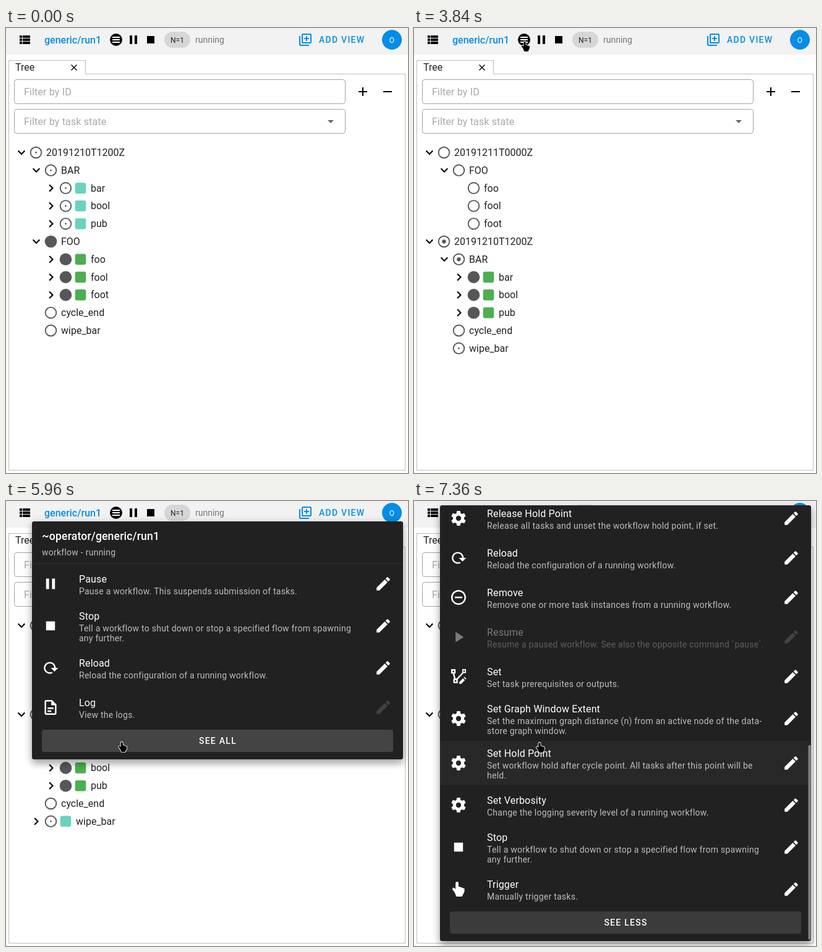
An HTML page with a canvas that plays this animation: 650x720 px, repeating every 8000 ms.

```html
<!DOCTYPE html>
<html lang="en">
<head>
<meta charset="utf-8">
<title>Workflow tree and command menu</title>
<style>
  html, body { margin: 0; width: 650px; height: 720px; overflow: hidden; background: #fff; }
  canvas { display: block; }
</style>
</head>
<body>
<canvas id="stage" width="650" height="720"></canvas>
<script>
const ctx = document.getElementById('stage').getContext('2d');
const LOOP = 8000;
const BLUE = '#058de7', INK = '#212121', GREY = '#575757';
const JOB = { submitted: '#6ad2bf', running: '#66a0ee', succeeded: '#4caf50' };

// Icons on a 24 unit grid
const DISC = 'M12,2A10,10 0 0,1 12,22A10,10 0 0,1 12,2';
const RING = DISC + 'M12,4A8,8 0 0,1 12,20A8,8 0 0,1 12,4';

function cogPath() {
  const points = [];
  for (let k = 0; k < 6; k++) {
    for (const [r, offset] of [[7.5, -22], [10.2, -12], [10.2, 12], [7.5, 22]]) {
      const a = (k * 60 + 30 + offset) * Math.PI / 180;
      points.push((12 + r * Math.cos(a)).toFixed(2) + ',' + (12 + r * Math.sin(a)).toFixed(2));
    }
  }
  return 'M' + points.join('L') + 'ZM12,8.5A3.5,3.5 0 0,1 12,15.5A3.5,3.5 0 0,1 12,8.5Z';
}

const icons = {
  list: 'M9,5V9H21V5M9,19H21V15H9M9,14H21V10H9M4,9H8V5H4M4,19H8V15H4M4,14H8V10H4V14Z',
  pause: 'M14,19H18V5H14M6,19H10V5H6V19Z',
  stop: 'M18,18H6V6H18V18Z',
  add: 'M4,6H2V20A2,2 0 0,0 4,22H18V20H4V6M20,2H8A2,2 0 0,0 6,4V16A2,2 0 0,0 8,18H20A2,2 0 0,0 22,16V4A2,2 0 0,0 20,2M20,16H8V4H20V16M13,14H15V11H18V9H15V6H13V9H10V11H13V14',
  plus: 'M19,13H13V19H11V13H5V11H11V5H13V11H19V13Z',
  minus: 'M19,13H5V11H19V13Z',
  caret: 'M7,10L12,15L17,10H7Z',
  down: 'M7.41,8.3L12,12.9L16.59,8.3L18.1,9.8L12,15.9L5.9,9.8Z',
  right: 'M8.4,16.58L12.98,12L8.4,7.41L9.9,5.9L16,12L9.9,18.1Z',
  pencil: 'M20.71,7.04C21.1,6.65 21.1,6 20.71,5.63L18.37,3.29C18,2.9 17.35,2.9 16.96,3.29L15.12,5.12L18.87,8.87M3,17.25V21H6.75L17.81,9.93L14.06,6.18L3,17.25Z',
  reload: 'M19,12H22.32L17.37,16.95L12.42,12H16.97C17,10.46 16.42,8.93 15.24,7.75C12.9,5.41 9.1,5.41 6.76,7.75C4.42,10.09 4.42,13.9 6.76,16.24C8.6,18.08 11.36,18.47 13.58,17.41L15.05,18.88C12,20.69 8,20.29 5.34,17.65C2.22,14.53 2.23,9.47 5.35,6.35C8.5,3.22 13.53,3.21 16.66,6.34C18.22,7.9 19,9.95 19,12Z',
  file: 'M6,2A2,2 0 0,0 4,4V20A2,2 0 0,0 6,22H18A2,2 0 0,0 20,20V8L14,2H6M6,4H13V9H18V20H6V4M8,12V14H16V12H8M8,16V18H13V16H8Z',
  horn: 'M12,8H4A2,2 0 0,0 2,10V14A2,2 0 0,0 4,16H5V20A1,1 0 0,0 6,21H8A1,1 0 0,0 9,20V16H12L17,20V4L12,8M21.5,12C21.5,13.71 20.54,15.26 19,16V8C20.53,8.75 21.5,10.3 21.5,12Z',
  bin: 'M19,4H15.5L14.5,3H9.5L8.5,4H5V6H19M6,19A2,2 0 0,0 8,21H16A2,2 0 0,0 18,19V7H6V19Z',
  cog: cogPath(),
  hold: RING + 'M13,16V8H15V16H13M9,16V8H11V16H9',
  kill: DISC + 'M15.59,7L12,10.59L8.41,7L7,8.41L10.59,12L7,15.59L8.41,17L12,13.41L15.59,17L17,15.59L13.41,12L17,8.41Z',
  mail: 'M20,8L12,13L4,8V6L12,11L20,6M20,4H4C2.89,4 2,4.89 2,6V18A2,2 0 0,0 4,20H20A2,2 0 0,0 22,18V6C22,4.89 21.1,4 20,4Z',
  play: 'M8,5.14V19.14L19,12.14L8,5.14Z',
  poll: DISC + 'M18,11H13L14.81,9.19A3.94,3.94 0 0,0 12,8A4,4 0 1,0 15.86,13H17.91A6,6 0 1,1 12,6A5.91,5.91 0 0,1 16.22,7.78L18,6Z',
  release: RING + 'M10,16.5L16,12L10,7.5Z',
  remove: RING + 'M7,13H17V11H7Z',
  nodes: 'M2,2H8V8H6.3L8,14.5H9.5L17,6.5V2H22V7.5H18.7L11,16V21H5V15H6L4.3,8H2ZM4,4V6H6V4ZM7,17V19H9V17ZM18.5,3.7V5.7H20.5V3.7ZM13,19.5V22H15.5L20.5,17L18,14.5ZM19,13.5L20,12.5L22.5,15L21.5,16Z',
  hand: 'M10,2A2,2 0 0,1 12,4V8.5C12,8.5 14,8.25 14,9.25C14,9.25 16,9 16,10C16,10 18,9.75 18,10.75C18,10.75 20,10.5 20,11.5V15C20,16 17,21 17,22H9C9,22 7,15 4,13C4,13 3,7 8,12V4A2,2 0 0,1 10,2Z'
};
for (const name in icons) icons[name] = new Path2D(icons[name]);
const arrow = new Path2D('M0,0V16L3.7,12.6L6.3,18.2L9,17L6.5,11.6H11.5Z');

// Commands: icon, title, text lines, flags (d = disabled, r = read only)
const commands = [
  ['horn', 'Broadcast', 'Override `[runtime]` configurations in a running workflow.'],
  ['bin', 'Clean', 'Clean a workflow from the run directory.', 'd'],
  ['cog', 'Ext Trigger', 'Report an external event message to a scheduler.'],
  ['hold', 'Hold', 'Hold tasks within a workflow.'],
  ['kill', 'Kill', 'Kill running or submitted jobs.'],
  ['file', 'Log', 'View the logs.', 'r'],
  ['mail', 'Message', 'Record task messages.'],
  ['pause', 'Pause', 'Pause a workflow. This suspends submission of tasks.'],
  ['play', 'Play', 'Start, resume or restart a workflow run.', 'd'],
  ['poll', 'Poll', 'Poll (query) jobs to verify and update their statuses.'],
  ['release', 'Release', 'Release held tasks within a workflow.'],
  ['cog', 'Release Hold Point', 'Release all tasks and unset the workflow hold point, if set.'],
  ['reload', 'Reload', 'Reload the configuration of a running workflow.'],
  ['remove', 'Remove', 'Remove one or more task instances from a running workflow.'],
  ['play', 'Resume', 'Resume a paused workflow. See also the opposite command `pause`.', 'd'],
  ['nodes', 'Set', 'Set task prerequisites or outputs.'],
  ['cog', 'Set Graph Window Extent', 'Set the maximum graph distance (n) from an active node of the data-\nstore graph window.'],
  ['cog', 'Set Hold Point', 'Set workflow hold after cycle point. All tasks after this point will be\nheld.'],
  ['cog', 'Set Verbosity', 'Change the logging severity level of a running workflow.'],
  ['stop', 'Stop', 'Tell a workflow to shut down or stop a specified flow from spawning\nany further.'],
  ['hand', 'Trigger', 'Manually trigger tasks.']
];
const shortList = ['Pause', 'Stop', 'Reload', 'Log'].map(n => commands.find(c => c[1] === n));

const clamp = v => Math.min(1, Math.max(0, v));
const smooth = v => (v = clamp(v), v * v * (3 - 2 * v));

function text(str, x, y, size, color, weight = 400, spacing = 0, align = 'left') {
  ctx.font = `${weight} ${size}px Roboto, sans-serif`;
  ctx.letterSpacing = spacing + 'px';
  ctx.textAlign = align;
  ctx.fillStyle = color;
  ctx.fillText(str, x, y);
}

function icon(name, x, y, color, scale = 1) {
  ctx.save();
  ctx.translate(x - 12 * scale, y - 12 * scale);
  ctx.scale(scale, scale);
  ctx.fillStyle = color;
  ctx.fill(icons[name], 'evenodd');
  ctx.restore();
}

function box(x, y, w, h, color) {
  ctx.fillStyle = color;
  ctx.fillRect(x, y, w, h);
}

function roundBox(x, y, w, h, r) {
  ctx.beginPath();
  ctx.roundRect(x, y, w, h, r);
}

function disc(x, y, r, color) {
  ctx.beginPath();
  ctx.arc(x, y, r, 0, 7);
  ctx.fillStyle = color;
  ctx.fill();
}

// Pointer moves: start, end, from x, y, to x, y
const moves = [
  [1880, 3400, 60, 612, 179, 22],
  [5080, 5880, 179, 22, 187, 388],
  [5920, 6040, 187, 388, 188, 395],
  [6640, 7240, 188, 395, 203, 391]
];

function pointer(t) {
  const move = moves.findLast(m => t >= m[0]);
  if (!move) return null;
  const [start, end, x0, y0, x1, y1] = move;
  const u = clamp((t - start) / (end - start));
  const first = move === moves[0];
  const p = smooth(first ? 1 - (1 - u) ** 2 : u);
  const px = first ? 1 - (1 - p) ** 2 : p;
  return { x: x0 + (x1 - x0) * px, y: y0 + (y1 - y0) * p };
}

function drawPointer(t) {
  const p = pointer(t);
  if (!p) return;
  const hand = p.y < 31 || (t >= 4360 && p.y > 102);
  ctx.save();
  ctx.translate(p.x, p.y);
  if (hand) {
    ctx.scale(0.8, 0.8);
    ctx.translate(-10, -2);
  }
  const shape = hand ? icons.hand : arrow;
  ctx.lineJoin = 'round';
  ctx.lineWidth = 2.2;
  ctx.strokeStyle = '#fff';
  ctx.stroke(shape);
  ctx.fillStyle = '#000';
  ctx.fill(shape);
  ctx.restore();
}

function drawToolbar() {
  box(0, 0, 650, 43, '#f2f2f2');
  icon('list', 30, 19, '#000');
  text('generic/run1', 62, 25, 16, BLUE, 500);
  disc(178, 19, 10, '#000');
  for (const y of [14, 18, 22]) box(172, y, 12, 2, '#fff');
  icon('pause', 206, 19, '#000');
  icon('stop', 234, 19, '#000');
  roundBox(256, 6, 42, 26, 13);
  ctx.fillStyle = '#d6d6d6';
  ctx.fill();
  text('N=1', 277, 24, 12, INK, 400, 0, 'center');
  text('running', 306, 24, 14, '#757575');
  icon('add', 484, 19, BLUE);
  text('ADD VIEW', 506, 24, 14, BLUE, 500, 1.25);
  disc(624, 19, 16, BLUE);
  text('O', 624, 23.5, 12, '#fff', 400, 0, 'center');
}

function drawField(y, label, hovered) {
  roundBox(13.5, y + 0.5, 535, 39, 4);
  ctx.lineWidth = 1;
  ctx.strokeStyle = hovered ? '#333' : '#a3a3a3';
  ctx.stroke();
  text(label, 29, y + 26, 16, '#a9a9a9', 400, 0.15);
}

function drawPanel(t) {
  ctx.lineWidth = 1;
  ctx.strokeStyle = '#bdbdbd';
  ctx.strokeRect(4.5, 74.5, 641, 641);
  ctx.strokeRect(4.5, 52.5, 124, 22);
  box(5, 74, 123, 1, '#fff');
  text('Tree', 15, 69, 16, INK);
  ctx.beginPath();
  ctx.moveTo(105.5, 59.5); ctx.lineTo(114.5, 68.5);
  ctx.moveTo(114.5, 59.5); ctx.lineTo(105.5, 68.5);
  ctx.lineWidth = 1.5;
  ctx.strokeStyle = '#111';
  ctx.stroke();

  const p = pointer(t - 60);
  const over = y => p && p.y >= y && p.y <= y + 40;
  drawField(83, 'Filter by ID', over(83));
  drawField(131, 'Filter by task state', over(131));
  icon('caret', 525, 151, '#666');
  icon('plus', 577, 103, '#000');
  icon('minus', 617, 103, '#000');
}

// Rows: depth, task state, name, job state, open
function treeRows(t) {
  const rows = [];
  const active = t < 1440 ? 'submitted' : 'running';
  const node = (depth, state, name, open) => rows.push([depth, state, name, null, open]);
  const task = (depth, state, name) => rows.push([depth, state, name, state]);
  const foos = ['foo', 'fool', 'foot'];
  if (t >= 1880) {
    node(0, 'waiting', '20191211T0000Z', true);
    node(1, 'waiting', 'FOO', true);
    for (const name of foos) node(2, 'waiting', name);
  }
  node(0, active, '20191210T1200Z', true);
  node(1, active, 'BAR', true);
  for (const name of ['bar', 'bool', 'pub']) {
    const doneAt = name === 'pub' ? 3840 : 1880;
    task(2, t < doneAt ? active : 'succeeded', name);
  }
  if (t < 3440) {
    node(1, 'succeeded', 'FOO', true);
    for (const name of foos) task(2, 'succeeded', name);
  }
  node(1, 'waiting', 'cycle_end');
  if (t >= 4400) task(1, 'submitted', 'wipe_bar');
  else node(1, t < 3840 ? 'waiting' : 'submitted', 'wipe_bar');
  return rows;
}

function drawTask(x, y, state, isTask) {
  if (state === 'succeeded') return disc(x, y, 9.8, GREY);
  disc(x, y, 9, state === 'running' && isTask ? '#b8b8b8' : '#fff');
  ctx.beginPath();
  ctx.arc(x, y, 8.8, 0, 7);
  ctx.lineWidth = 1.9;
  ctx.strokeStyle = GREY;
  ctx.stroke();
  if (state === 'submitted') disc(x, y, 1.4, GREY);
  if (state === 'running') disc(x, y, 3.2, GREY);
}

function drawTree(t) {
  treeRows(t).forEach(([depth, state, name, job, open], i) => {
    const y = 201.5 + 28.8 * i, x = 48.5 + 24 * depth;
    if (open || job) icon(open ? 'down' : 'right', x - 23.5, y, '#000');
    drawTask(x, y, state, job);
    if (job) {
      roundBox(x + 15.2, y - 8.8, 17.6, 17.6, 3);
      ctx.fillStyle = JOB[job];
      ctx.fill();
    }
    text(name, x + (job ? 40.5 : 16.5), Math.round(y + 5.5), 16, INK);
  });
  if (t >= 1880 && t < 3440) for (const y of [618, 621, 624]) box(57, y, 8, 2, '#555');
}

function drawCommand([name, title, detail, flag], y, h) {
  const lines = detail.split('\n');
  const mid = y + h / 2, shift = lines.length > 1 ? 8 : 0;
  ctx.globalAlpha = flag === 'd' ? 0.4 : 1;
  icon(name, 72, mid, '#fff', 1.2);
  text(title, 118, mid - 2 - shift, 16, '#fff', 400, 0.15);
  lines.forEach((line, i) => text(line, 118, mid + 17 - shift + 16 * i, 14, '#bcbcbc', 400, 0.25));
  ctx.globalAlpha = flag ? 0.15 : 1;
  icon('pencil', 610, mid, '#fff', 1.2);
  ctx.globalAlpha = 1;
}

function menuSurface(top, bottom) {
  roundBox(42, top, 600, bottom - top, 4);
  ctx.save();
  ctx.fillStyle = INK;
  for (const [dy, blur, alpha] of [[8, 11, 0.22], [3, 15, 0.2]]) {
    ctx.shadowColor = `rgba(0,0,0,${alpha})`;
    ctx.shadowBlur = blur;
    ctx.shadowOffsetY = dy;
    ctx.fill();
  }
  ctx.restore();
}

function drawButton(y, label, hovered, t) {
  ctx.save();
  roundBox(58, y, 568, 36, 4);
  ctx.fillStyle = hovered ? '#444' : '#3b3b3b';
  ctx.fill();
  if (t >= 6200 && t < 6520) {
    ctx.clip();
    disc(188, 395, 40 + 400 * smooth((t - 6200) / 200), 'rgba(255,255,255,.1)');
  }
  ctx.restore();
  text(label, 342.5, y + 23, 14, '#fff', 500, 1.25, 'center');
}

function drawMenu(t) {
  const full = t >= 6520;
  const top = full ? 7 : 33, bottom = full ? 712 : 418;
  const scroll = 784 * smooth((t - 6560) / 720);
  const p = pointer(t), late = pointer(t - 200);
  const canHover = full ? t >= 7280 : t >= 5080;
  menuSurface(top, bottom);

  ctx.save();
  roundBox(42, top, 600, bottom - top, 4);
  ctx.clip();
  let y = top - scroll;
  text('~operator/generic/run1', 58, y + 30, 17.6, '#fff', 500, 0.16);
  text('workflow - running', 58, y + 55, 14, '#bcbcbc', 400, 0.25);
  box(42, y + 68, 600, 1, '#2f2f2f');
  y += 69;
  for (const command of full ? commands : shortList) {
    const h = command[2].includes('\n') ? 72 : 64;
    if (canHover && late.y >= y && late.y < y + h) box(42, y, 600, h, '#282828');
    drawCommand(command, y, h);
    y += h;
  }
  drawButton(y + 4, full ? 'SEE LESS' : 'SEE ALL', !full && p.y >= y + 4, t);
  if (full) {
    roundBox(637.5, 10 + 385 * scroll / 784, 4, 315, 2);
    ctx.fillStyle = '#828282';
    ctx.fill();
  }
  ctx.restore();
}

function draw(now) {
  const t = now % LOOP;
  box(0, 0, 650, 720, '#fff');
  drawToolbar();
  drawPanel(t);
  drawTree(t);
  if (t >= 4360) drawMenu(t);
  drawPointer(t);
  requestAnimationFrame(draw);
}
requestAnimationFrame(draw);
</script>
</body>
</html>
```
